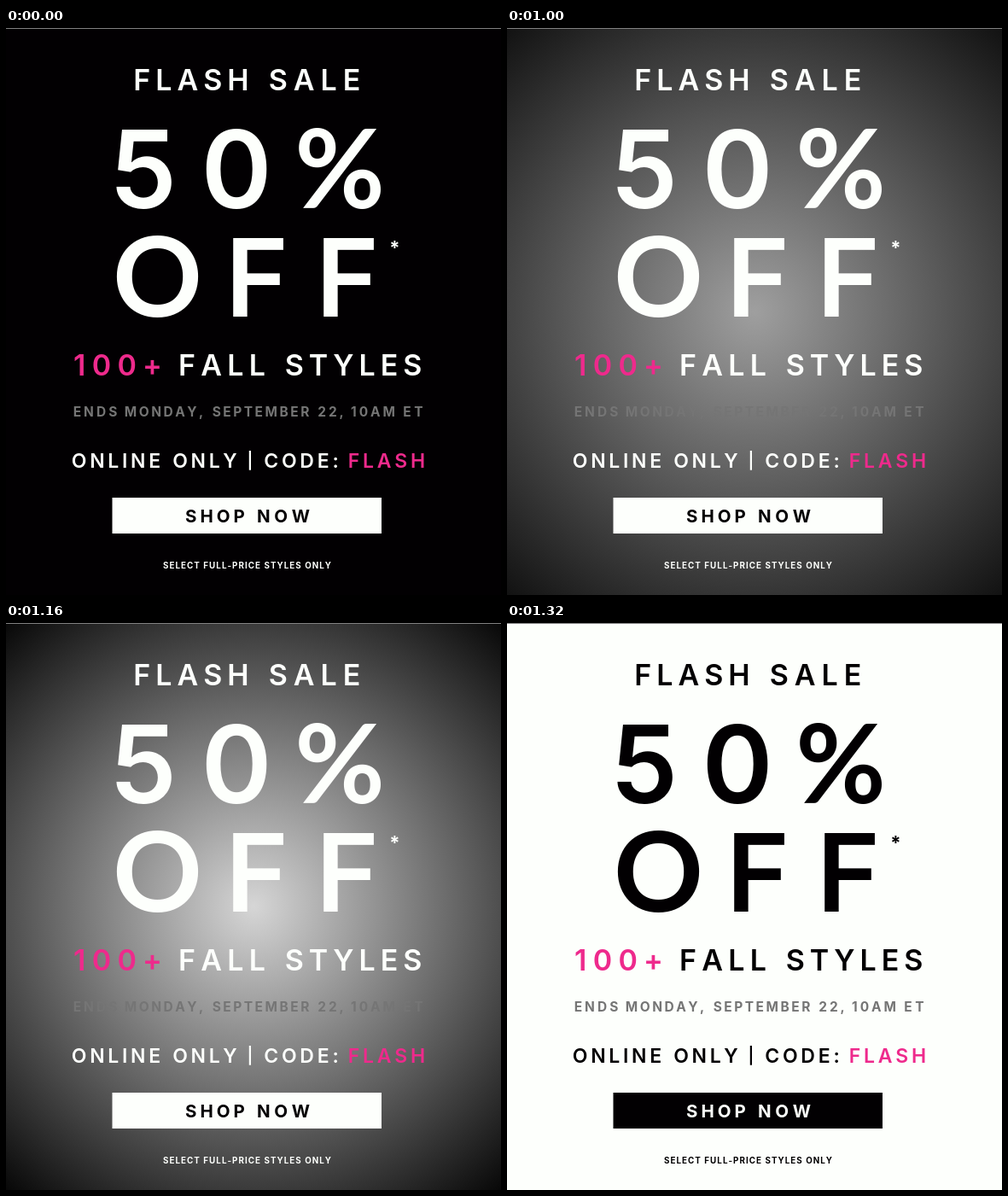
An HTML page for the animation above (1.4 s loop, 580 px wide and 664 px high).

```html
<!DOCTYPE html>
<html lang="en">
<head>
<meta charset="utf-8">
<title>Flash sale</title>
<style>
  html, body { margin: 0; width: 100%; height: 100%; overflow: hidden; background: #020002; }
  svg { display: block; width: 580px; height: 664px; color: #fdfffc; }
  text {
    font-family: Inter, "Open Sans", sans-serif;
    font-kerning: none;
    text-anchor: middle;
    fill: currentColor;
  }
  .round { font-family: Lato, Inter, sans-serif; }
  .pink { fill: #ee2a8c; }
  .gray { fill: #757575; }
</style>
</head>
<body>
<svg id="stage" viewBox="0 0 580 664">
  <defs>
    <radialGradient id="glow" gradientUnits="userSpaceOnUse" cx="290" cy="332" r="440">
      <stop id="core" offset="0" stop-color="#020002"/>
      <stop id="rim" offset="1" stop-color="#020002"/>
    </radialGradient>
  </defs>
  <rect width="580" height="664" fill="url(#glow)"/>
  <rect width="580" height="1" fill="#808080"/>
  <rect x="124.5" y="550" width="315.5" height="42" fill="currentColor"/>
  <g id="copy"></g>
  <g id="label"></g>
</svg>
<script>
const BLACK = '#020002', WHITE = '#fdfffc';
const LOOP = 1400;
const TIMES = [0, 1000, 1100, 1200];
const $ = id => document.getElementById(id);

// Each word: text, centre x, tracking, optional class.
const lines = [
  { size: 34, weight: 600, y: 72.5, words: [['FLASH', 217, 6], ['SALE', 361.5, 7]] },
  { size: 126, weight: 600, y: 210.5, words: [['5', 161.5, 0], ['0', 270, 0]] },
  { size: 129, weight: 700, y: 210.5, words: [['%', 391, 0, 'round']] },
  { size: 130, weight: 700, y: 338, words: [['O', 177.5, 0, 'round']] },
  { size: 126, weight: 600, y: 337.5, words: [['F', 294, 0], ['F', 400, 0]] },
  { size: 22, weight: 700, y: 265, words: [['*', 455.5, 0]] },
  { size: 34, weight: 600, y: 406.5, words: [['100+', 131, 7.3, 'pink'], ['FALL', 253, 6.3], ['STYLES', 407, 6]] },
  { size: 15.5, weight: 700, y: 454.5, words: [
    ['ENDS', 104.5, 3, 'gray'], ['MONDAY,', 185, 2.5, 'gray'], ['SEPTEMBER', 298.5, 2.5, 'gray'],
    ['22,', 380.5, 2.8, 'gray'], ['10AM', 430, 2.9, 'gray'], ['ET', 477, 3.6, 'gray']] },
  { size: 23, weight: 600, y: 514.5, words: [
    ['ONLINE', 129, 3.7], ['ONLY', 233, 3.6], ['CODE:', 346, 3.8], ['FLASH', 446, 3.8, 'pink']] },
  { size: 19, weight: 600, y: 513, words: [['|', 286, 0]] },
  { size: 9.8, weight: 700, y: 632.5, words: [['SELECT FULL-PRICE STYLES ONLY', 282.5, 1.05]] }
];
const button = { size: 20.5, weight: 700, y: 579, words: [['SHOP', 245, 4], ['NOW', 325, 4.7]] };

function addLine(parent, { size, weight, y, words }) {
  for (const [content, centre, tracking, style = ''] of words) {
    const node = document.createElementNS('http://www.w3.org/2000/svg', 'text');
    node.textContent = content;
    node.setAttribute('class', style);
    node.setAttribute('x', centre + tracking / 2); // offsets the trailing space
    node.setAttribute('y', y);
    node.style.fontSize = size + 'px';
    node.style.fontWeight = weight;
    node.style.letterSpacing = tracking + 'px';
    if (parent.id === 'label') node.style.fill = 'inherit';
    parent.append(node);
  }
}

lines.forEach(line => addLine($('copy'), line));
addLine($('label'), button);

function play(id, property, values) {
  const frames = values.map((value, i) => (
    { [property]: value, offset: TIMES[i] / LOOP, easing: 'step-end' }));
  frames.push({ [property]: values[values.length - 1], offset: 1 });
  $(id).animate(frames, { duration: LOOP, iterations: Infinity }).startTime = 0;
}

play('core', 'stopColor', [BLACK, '#9f9f9f', '#d6d6d6', WHITE]);
play('rim', 'stopColor', [BLACK, '#121212', '#080808', WHITE]);
play('stage', 'color', [WHITE, WHITE, WHITE, BLACK]);
play('label', 'fill', [BLACK, BLACK, BLACK, WHITE]);
</script>
</body>
</html>
```
